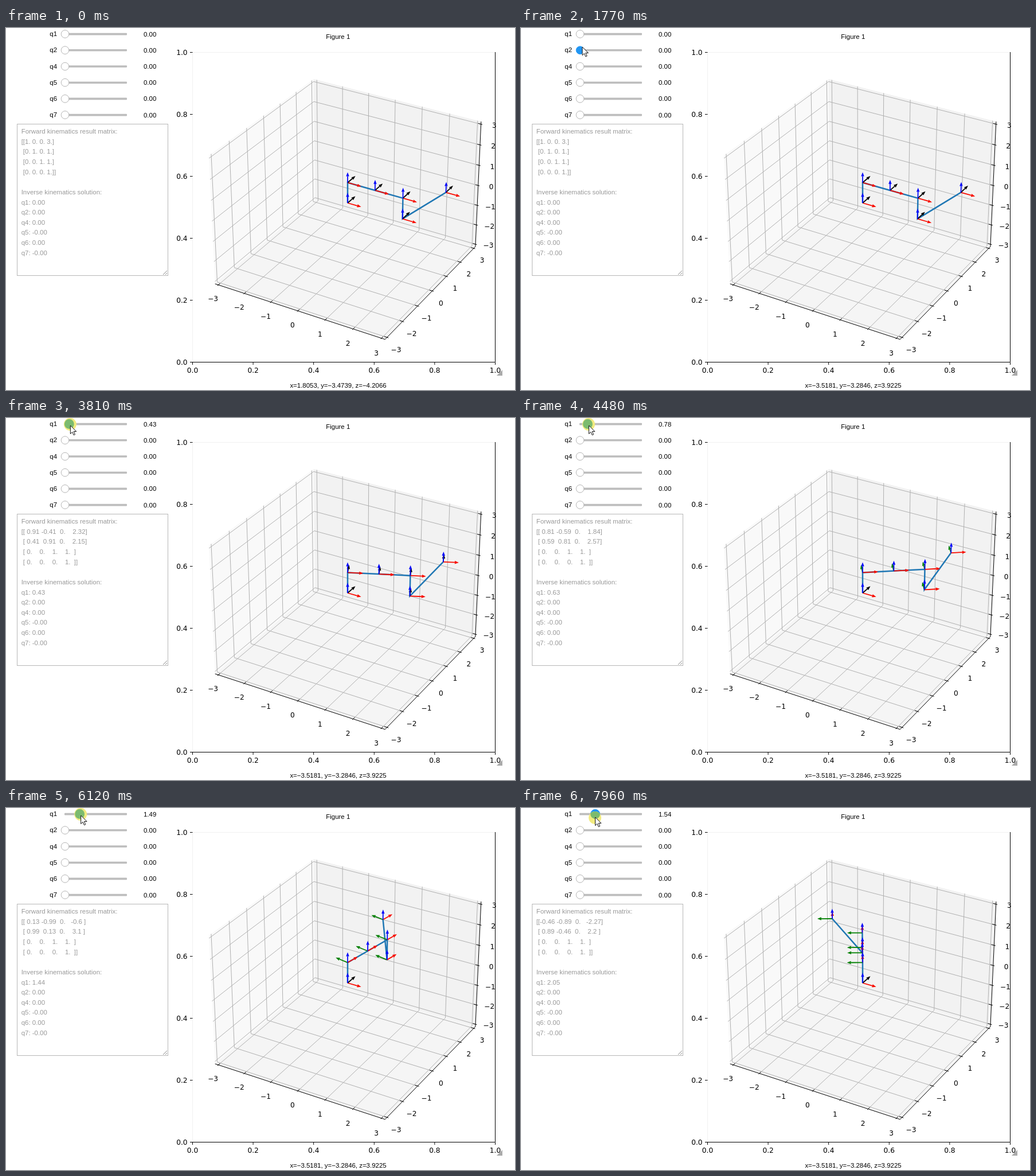
These frames come from a looping animation (888x631 px, 8000 ms). An HTML page:

```html
<!DOCTYPE html>
<html lang="en">
<head>
<meta charset="utf-8">
<title>Arm kinematics</title>
<style>
  html, body { margin: 0; width: 100%; height: 100%; overflow: hidden; background: #fff; }
  svg { display: block; width: 888px; height: 631px; }
  text { white-space: pre; font: 11.44px "Liberation Sans", Arial, sans-serif; }
  .tick { font: 12.2px "DejaVu Sans", sans-serif; }
  .log { fill: #999; }
</style>
</head>
<body>
<svg id="stage" viewBox="0 0 888 631"></svg>
<script>
const NS = 'http://www.w3.org/2000/svg';
const stage = document.getElementById('stage');
const LOOP = 8000;

function set(el, attrs) {
  for (const k in attrs) el.setAttribute(k, attrs[k]);
}
function add(tag, attrs, parent = stage) {
  const el = document.createElementNS(NS, tag);
  set(el, attrs);
  parent.appendChild(el);
  return el;
}
function label(x, y, str, anchor = 'start', cls = '') {
  const el = add('text', { x, y, 'text-anchor': anchor, class: cls });
  el.textContent = str;
  return el;
}
const line = (pts, stroke, width = 1, fill = 'none') =>
  add('polyline', { points: pts.join(' '), stroke, 'stroke-width': width, fill });
const minus = s => String(s).replace('-', '\u2212');

// Perspective view: elevation 30, azimuth -60, distance 10
const CX = 596, CY = 305, SCALE = 528 / 0.185, C = Math.sqrt(3) / 2;
function project([x, y, z]) {
  x *= 4 / 21; y *= 4 / 21; z /= 7;
  const k = SCALE / (10 - (C / 2 * x - 0.75 * y + z / 2));
  const right = C * x + y / 2;
  const up = -x / 4 + C / 2 * y + C * z;
  return [CX + right * k, CY - up * k].map(v => +v.toFixed(2));
}
const line3 = (pts, ...style) => line(pts.map(project), ...style);

// Flat axes
line([[325.5, 582], [325.5, 42.5], [853, 42.5]], '#f1f1f1');
line([[325, 582.5], [853.5, 582.5], [853.5, 42]], '#000');
for (let i = 0; i <= 5; i++) {
  const v = (i / 5).toFixed(1), x = 325.5 + 528 * i / 5, y = 582.5 - 108 * i;
  line([[x, 583], [x, 587]], '#000');
  line([[321, y], [325.5, y]], '#000');
  label(x, 600.6, v, 'middle', 'tick');
  label(316.6, y + 4.4, v, 'end', 'tick');
}

// Panes, grid, axis lines
const L = 3.125, PAD = L + 0.32, OUT = L + 0.05, IN = L - 0.1;
function mark(v, outer, inner, at) {
  line3([outer, inner], '#000');
  const [x, y] = project(at);
  label(x, y + 9.5, minus(v), 'middle', 'tick');
}
line3([[-L, -L, -L], [-L, L, -L], [-L, L, L], [-L, -L, L]], 'none', 0, '#f9f9f9');
line3([[-L, L, -L], [L, L, -L], [L, L, L], [-L, L, L]], 'none', 0, '#f2f2f2');
line3([[-L, -L, -L], [L, -L, -L], [L, L, -L], [-L, L, -L]], 'none', 0, '#f5f5f5');
for (let v = -3; v <= 3; v++) {
  line3([[v, L, L], [v, L, -L], [v, -L, -L]], '#b0b0b0');
  line3([[-L, v, L], [-L, v, -L], [L, v, -L]], '#b0b0b0');
  line3([[-L, -L, v], [-L, L, v], [L, L, v]], '#b0b0b0');
}
line3([[-L, -L, -L], [L, -L, -L], [L, L, -L], [L, L, L]], '#000');
for (let v = -3; v <= 3; v++) {
  mark(v, [v, -OUT, -L], [v, -IN, -L], [v, -PAD, -PAD]);
  mark(v, [OUT, v, -L], [IN, v, -L], [PAD, v, -PAD]);
  mark(v, [OUT, L, v], [IN, L, v], [PAD, PAD, v]);
}
label(579.3, 19, 'Figure 1', 'middle');
const coords = label(579.5, 627, '', 'middle');
add('path', { d: 'M866 596V606H856Z', fill: '#aaa' });

// Robot
const RED = '#f80c00', GREEN = '#008000', BLUE = '#0508fa', BLACK = '#000';
const joints = [[0, 0, 1], [1, 0, 1], [2, 0, 1], [2, 0, 0], [3, 1, 1]];
const links = line([], '#1f77b4', 2.5);
const makeArrow = () => ({ shaft: line([], BLACK, 1.8), head: add('polygon', {}) });
const makeTriad = () => [makeArrow(), makeArrow(), makeArrow()];
function aim(arrow, from, to, color) {
  const [ax, ay] = project(from), [bx, by] = project(to);
  const len = Math.hypot(bx - ax, by - ay) || 1;
  const ux = (bx - ax) / len, uy = (by - ay) / len, h = Math.min(7, len), w = 2.7;
  const mx = bx - ux * h, my = by - uy * h;
  set(arrow.shaft, { points: `${ax},${ay} ${mx},${my}`, stroke: color });
  set(arrow.head, {
    points: `${bx},${by} ${mx - uy * w},${my + ux * w} ${mx + uy * w},${my - ux * w}`,
    fill: color
  });
}
function aimTriad(triad, p, q, yColor) {
  const c = Math.cos(q) / 2, s = Math.sin(q) / 2;
  const tip = (x, y, z) => [p[0] + x, p[1] + y, p[2] + z];
  aim(triad[0], p, tip(c, s, 0), RED);
  aim(triad[1], p, tip(-s, c, 0), yColor);
  aim(triad[2], p, tip(0, 0, 0.5), BLUE);
}
aimTriad(makeTriad(), [0, 0, 0], 0, BLACK);
const triads = joints.map(makeTriad);
function drawRobot(q) {
  const c = Math.cos(q), s = Math.sin(q);
  const pts = joints.map(([x, y, z]) => [x * c - y * s, x * s + y * c, z]);
  set(links, { points: [[0, 0, 0], ...pts].map(project).join(' ') });
  pts.forEach((p, i) => aimTriad(triads[i], p, q, q < 0.5 ? BLACK : GREEN));
}

// Sliders
const names = ['q1', 'q2', 'q4', 'q5', 'q6', 'q7'];
const sliders = names.map((name, i) => {
  const y = 10.5 + 28.2 * i;
  label(89, y + 3.6, name, 'end');
  add('rect', { x: 102, y: y - 1.7, width: 109, height: 3.6, rx: 1, fill: '#bdbdbd' });
  return { value: label(240, y + 4, '0.00'), knob: add('circle', { cx: 103, cy: y }) };
});
function paintKnob({ knob }, hot, r = 6.8) {
  set(knob, { fill: hot ? '#2196f3' : '#fff', stroke: hot ? '#2196f3' : '#b5b5b5', r });
}
sliders.forEach(s => paintKnob(s, false));

// Log box
add('rect', { x: 19.5, y: 167.5, width: 263, height: 264, fill: '#fff', stroke: '#b8b8b8' });
line([[274, 430], [281, 423]], '#888');
line([[278, 430], [281, 427]], '#888');
const log = Array.from({ length: 13 }, (_, i) => label(26.7, 184.2 + 17.62 * i, '', 'start', 'log'));
function cell(v) {
  const [whole, frac = ''] = String(+v.toFixed(2) + 0).split('.');
  return (whole + '.' + frac.padEnd(2)).padStart(5);
}
function matrixRows(q) {
  const c = Math.cos(q), s = Math.sin(q);
  const m = [[c, -s, 0, 3 * c - s], [s, c, 0, 3 * s + c], [0, 0, 1, 1], [0, 0, 0, 1]];
  const show = q ? cell : v => v + '.';
  return m.map((r, i) => (i ? ' [' : '[[') + r.map(v => show(v + 0)).join(' ') + (i < 3 ? ']' : ']]'));
}
function drawLog(q) {
  const angles = names.map((n, i) => `${n}: ${i ? (n === 'q5' || n === 'q7' ? '-0.00' : '0.00') : q.toFixed(2)}`);
  const rows = ['Forward kinematics result matrix:', ...matrixRows(q), '',
    'Inverse kinematics solution:', ...angles];
  rows.forEach((r, i) => { log[i].textContent = r; });
}

// Pointer with press highlight
const spotClip = add('circle', { r: 11 }, add('clipPath', { id: 'spot' }));
const spot = add('circle', { r: 11, fill: '#f2eb80' });
const tint = add('circle', { r: 8.4, cy: 10.5, fill: '#7cbb6e', 'clip-path': 'url(#spot)' });
const pointer = add('path', {
  d: 'M0 0V14.6L3.4 11.4 5.8 16.8 8.1 15.8 5.8 10.5H10.4Z',
  fill: '#fff', stroke: '#111', 'stroke-linejoin': 'round'
});

const PRESS = 2800, DRAG = 3140, BACK = 7640;
// Key points in slider pixels: time, knob, and the log and arm that trail it
const drag = [[DRAG, 0, 0, 0], [3350, 8, 4, 0], [3610, 8, 8, 8], [3810, 8, 8, 8], [5030, 20, 16, 15],
  [6120, 29, 28, 27], [6820, 43, 42, 33], [7150, 44, 43, 43], [BACK, 44, 43, 43], [7960, 30, 40, 41]];
// Pointer before the press: time, x, y
const path = [[330, 842, 588], [540, 640, 558], [740, 640, 558], [1020, 337, 193], [1220, 337, 193],
  [1560, 118, 90], [1770, 107, 33], [2040, 106, 27], [2590, 104, 14]];

function glide(keys, t, col) {
  const i = keys.findIndex(k => k[0] > t);
  if (i <= 0) return keys[i < 0 ? keys.length - 1 : 0][col];
  const a = keys[i - 1], b = keys[i];
  return a[col] + (b[col] - a[col]) * (t - a[0]) / (b[0] - a[0]);
}
// The slider moves in whole pixels, so every angle is stepped
function angle(t, col) {
  const n = Math.round(glide(drag, t, col));
  return n && 0.0209 + 0.0507 * n;
}
function readout(p) {
  const mix = (a, b) => minus((a + (b - a) * p).toFixed(4));
  return `x=${mix(1.8053, -3.5181)}, y=${mix(-3.4739, -3.2846)}, z=${mix(-4.2066, 3.9225)}`;
}

function render(t) {
  const q = angle(t, 1), knobX = 103 + 17.2 * q;
  const pressed = t >= PRESS, back = t >= BACK;
  drawRobot(angle(t, 3));
  drawLog(angle(t, 2));

  const pathX = glide(path, t, 1);
  coords.textContent = readout(Math.min(1, (842 - pathX) / 540));

  sliders[0].value.textContent = q.toFixed(2);
  set(sliders[0].knob, { cx: knobX });
  paintKnob(sliders[0], t >= 2240, pressed ? 8 : 6.8);
  paintKnob(sliders[1], t >= 1700 && t < 2110);

  const x = t < DRAG ? pathX : knobX + (back ? 0 : 2);
  const y = back ? 16 : glide(path, t, 2) - (pressed ? 1 : 0);
  const spotAt = { cx: x - 0.5, cy: back ? y + 1 : y - 2 };
  const visibility = pressed ? 'visible' : 'hidden';
  set(pointer, { transform: `translate(${x} ${y})`, visibility: t >= 330 ? 'visible' : 'hidden' });
  set(spot, { ...spotAt, visibility });
  set(spotClip, spotAt);
  set(tint, { cx: knobX, visibility });
}

const start = performance.now();
function tick(now) {
  render(Math.max(0, now - start) % LOOP);
  requestAnimationFrame(tick);
}
render(0);
requestAnimationFrame(tick);
</script>
</body>
</html>
```
